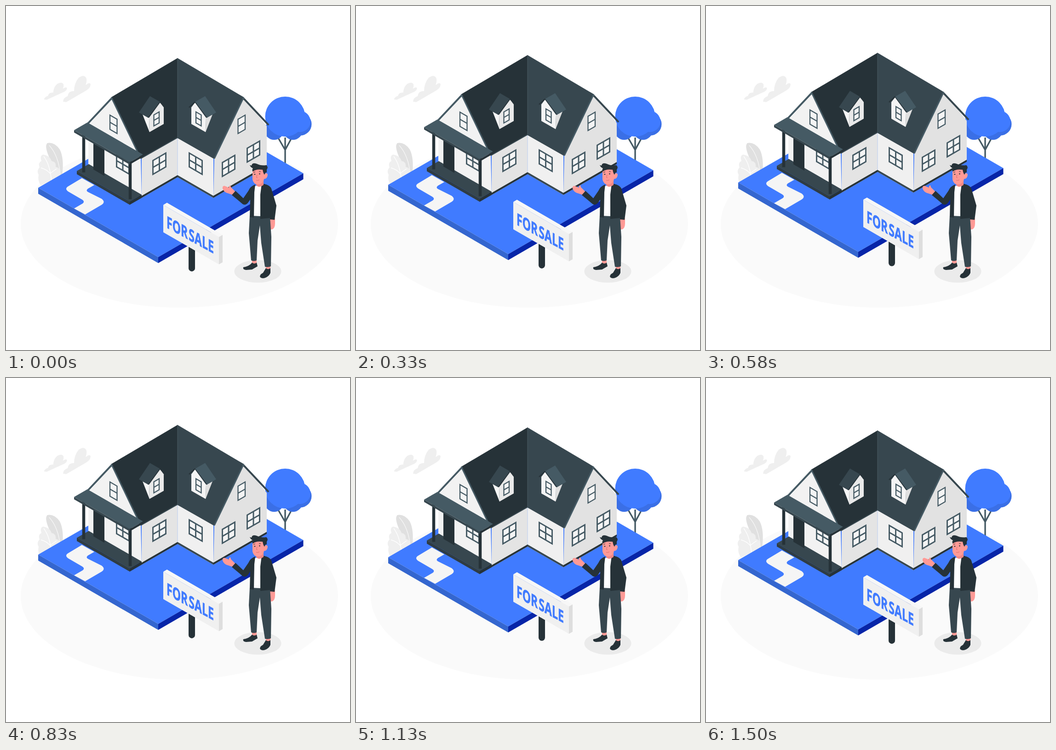
Write an HTML page that moves like this. It is 748 px wide and 748 px high and loops after 1.54 s.

```html
<!DOCTYPE html>
<html lang="en">
<head>
<meta charset="utf-8">
<title>House for sale</title>
<style>
html, body { margin: 0; width: 100%; height: 100%; overflow: hidden; background: #fff; }
svg { display: block; width: 100vw; height: 100vh; }
text { font: 700 36px "Open Sans", "Noto Sans", sans-serif; word-spacing: -6px; }
</style>
</head>
<body>
<svg viewBox="0 0 748 748">
  <ellipse cx="377" cy="474" rx="345" ry="182" fill="#fafafa"/>

  <g fill="#efefef">
    <path id="cloud" d="M124 208Q125 199 134 196Q136 184 148 185Q148 168 158 156Q171 147 175 158Q176 165 173 172Q183 164 184 171Q183 179 174 184L131 209Z"/>
    <use href="#cloud" transform="translate(-20 68) scale(.83 .65)"/>
  </g>

  <g fill="none" stroke-width="1.3">
    <path d="M90 298Q84 303 91 322Q99 342 104 352Q110 366 122 368Q127 332 117 312Q105 295 90 298Z" fill="#e0e0e0"/>
    <path d="M94 303Q114 325 118 366" stroke="#f7f7f7"/>
    <path d="M81 323Q73 325 77 337Q69 341 73 351Q66 358 71 367Q68 380 76 390L118 372Q119 350 108 350Q110 339 99 337Q96 326 81 323Z" fill="#efefef"/>
    <path d="M82 327Q96 345 99 382M76 352Q88 355 96 364L110 354" stroke="#fff"/>
  </g>

  <path d="M607 348V286M607 313L592 287M607 313L621 287" fill="none" stroke="#455a64" stroke-width="3.4"/>
  <g fill="#3a6fe6">
    <circle cx="583" cy="270" r="21"/><circle cx="624" cy="270" r="21"/><circle cx="640" cy="257" r="24.5"/>
  </g>
  <g fill="#407bff">
    <circle cx="607" cy="240.5" r="43.5"/><circle cx="639" cy="251" r="23"/>
  </g>

  <g id="lot">
    <g id="ground"></g>
    <path d="M165 375L135 393Q127 398 135 404L166 422Q172 426 167 430L148 441L172 454L208 433Q217 427 208 420L178 405Q173 402 178 398L192 390Z" fill="#f5f5f5"/>
    <g id="house"></g>
    <path d="M404 515V571" stroke="#263238" stroke-width="14" stroke-linecap="round"/>
    <g id="sign"></g>
    <text transform="matrix(.64 .355 0 1 349 482.5)" fill="#407bff" stroke="#407bff" stroke-width=".8">FOR SALE</text>
  </g>

  <ellipse cx="547.5" cy="577" rx="51" ry="24.5" fill="#ebebeb"/>

  <g fill="#ff9a96">
    <path d="M535 549H545V561L535 562ZM565 562H575V575L565 574Z"/>
    <path d="M498 403L489 394L488 390Q484 391 485 395L475 391Q470 391 471 397Q474 405 482 407L494 411Z"/>
    <path d="M573 461H585L585 473Q585 485 577 486Q570 484 571 478Q575 473 573 461Z"/>
  </g>
  <path d="M530 456L528 494L533 553Q539 556 545 553L547 510L552 477L555 515L563 567Q570 569 576 566L577 502L574 458Z" fill="#37474f"/>
  <path d="M540 392L556 388L559 449L538 451Z" fill="#fff"/>
  <g fill="#263238">
    <path d="M516 568Q514 573 522 574L535 573L547 566L545 558Q540 562 535 558Q529 566 516 568Z"/>
    <path d="M553 590Q550 585 559 580L565 570Q570 574 575 570L575 580Q573 586 566 590Q558 594 553 590Z"/>
    <path d="M542 388Q531 392 527 402L516 418L499 402L491 411L515 431Q521 434 526 428L531 421L530 459L539 460L540 405Z"/>
    <path d="M556 386Q573 388 577 397L588 434L584 465L574 464V461L553 463L553 410Z"/>
  </g>
  <path d="M545 375L560 372L560 389Q549 397 544 389Z" fill="#f58984"/>
  <path d="M536 354L562 352L562 365Q568 361 569 367Q568 376 561 376Q559 388 546 388Q538 387 536 377Z" fill="#ff9a96"/>
  <path d="M530 346Q532 351 537 353Q534 357 537 360Q543 354 558 356Q559 363 562 367Q564 361 567 362L567 356Q571 350 566 346Q555 348 545 343Q535 340 534 347Z" fill="#263238"/>
  <path d="M538 362L542 360.5M550 360L554 360.5" stroke="#263238"/>
  <path d="M546 367L544.5 373L547 373.5M544 379Q548 380 551 378" fill="none" stroke="#d9706e"/>
  <circle cx="541" cy="366" r="1.3" fill="#263238"/><circle cx="551.5" cy="365" r="1.3" fill="#263238"/>
</svg>

<script>
const DARK = "#263238", MID = "#37474f", LIGHT = "#455a64", GLASS = "#f4f4f4";
const SLOPE = Math.tan(Math.PI / 6);
const layer = id => document.getElementById(id);
const lot = layer("lot");
let into = layer("ground");
let side = 1; // 1 draws to the right of the inner corner, -1 mirrors to the left

// a runs down right, b down left, h up; the inner corner of the house is 0, 0, 0
const iso = ([a, b, h]) => `${373 + side * (a - b)} ${373 + (a + b) * SLOPE - h}`;

function path(points, attrs, close) {
  const el = document.createElementNS("http://www.w3.org/2000/svg", "path");
  el.setAttribute("d", "M" + points.map(iso).join("L") + (close ? "Z" : ""));
  for (const k in attrs) el.setAttribute(k, attrs[k]);
  into.append(el);
}
const face = (fill, ...points) => path(points, { fill }, true);
const line = (stroke, width, ...points) => path(points, { fill: "none", stroke, "stroke-width": width });

// Upright rectangle on the plane a = at or b = at
const spot = (axis, at, u, h) => axis === "a" ? [at, u, h] : [u, at, h];
function panel(fill, axis, at, [u0, u1], [h0, h1]) {
  face(fill, spot(axis, at, u0, h0), spot(axis, at, u1, h0), spot(axis, at, u1, h1), spot(axis, at, u0, h1));
}

function box(a, b, h, [top, faceA, faceB]) {
  face(top, [a[0], b[0], h[1]], [a[1], b[0], h[1]], [a[1], b[1], h[1]], [a[0], b[1], h[1]]);
  panel(faceA, "a", a[1], b, h);
  panel(faceB, "b", b[1], a, h);
}

function pane(axis, at, u, width, bottom, height, cols) {
  const thick = cols > 1 ? 2.9 : 2.3;
  const p = (i, j) => spot(axis, at, u + i * width, bottom + j * height);
  path([p(0, 0), p(1, 0), p(1, 1), p(0, 1)], { fill: GLASS, stroke: LIGHT, "stroke-width": thick }, true);
  line(LIGHT, thick, p(0, .5), p(1, .5));
  if (cols > 1) line(LIGHT, thick, p(.5, 0), p(.5, 1));
}

const WING = 78, DEPTH = 116;
const PEAK = [-58, -58, 192], APEX = [86, -58, 190], EAVE = [82, 2, 89], VALLEY = [0, 0, 86];

function walls(inner, gable, trimInner, trimGable) {
  panel(inner, "b", 0, [0, WING], [0, 88]);
  face(gable, [WING, 0, 0], EAVE, APEX, [WING, -DEPTH, 89], [WING, -DEPTH, 0]);
  panel(trimInner, "b", 0, [0, WING], [0, 4.5]);
  panel(trimGable, "a", WING, [-DEPTH, 0], [0, 4.5]);
  pane("b", 0, 25.5, 28, 37, 30, 2);
  pane("a", WING, -69, 15.5, 109, 31, 1);
}

function roof(color) {
  face(color, PEAK, APEX, EAVE, VALLEY);
  line(MID, 2, EAVE, VALLEY);
  line(LIGHT, 3, EAVE, APEX);
  line(side > 0 ? MID : LIGHT, 4, [86, -58, 187], [84, -114, 96]);
}

function dormer(color, rake, front, cheek) {
  const ridge = [48, 10, 197], back = [48, -12, 197], low = [70, 6, 173];
  face(cheek, [61, 0, 133], [62, 0, 165], [69, -7, 172]);
  face(front, [30, 0, 133], [30, 0, 169], [38, 0, 184], [62, 0, 165], [61, 0, 133]);
  pane("b", 0, 40, 11.5, 141, 24, 1);
  face(color, ridge, back, [70, -14, 173], low);
  line(rake, 2.5, ridge, [32, 7, 174]);
  line(rake, 1.2, ridge, low);
}

function porch() {
  const span = [-117, 4];
  box([WING, 104], [-115, 0], [0, 7], [MID, "#2f3c43", DARK]);
  panel(DARK, "a", WING, [-105, -81], [1, 59]);
  pane("a", WING, -54.5, 27, 36, 27, 2);
  for (const b of [-104, -3]) line(DARK, 6.5, [100, b, 8], [100, b, 92]);
  box([79, 108], span, [92, 97], [LIGHT, MID, DARK]);
}

// Runs a builder on both halves, each with its own colours
function both(build, right, left) {
  side = 1; build(...right);
  side = -1; build(...left);
  side = 1;
}

box([-131.5, 129.5], [-144, 171.5], [-13, 0], ["#407bff", "#0725a8", "#3466cf"]);

into = layer("house");
both(walls, ["#f0f0f0", "#e2e2e2", MID, DARK], ["#e4e4e4", "#f2f2f2", DARK, DARK]);
for (const b of [-19.5, -73.5]) pane("a", WING, b - 27, 27, 35.5, 30, 2);
line("#b9cdf0", 1, [0, 0, 5], VALLEY);
both(roof, [MID], [DARK]);
line("#52626b", .8, PEAK, VALLEY);
both(dormer, [LIGHT, DARK, "#f4f4f4", "#e0e0e0"], [MID, DARK, "#e9e9e9", "#f5f5f5"]);
side = -1;
porch();
side = 1;

into = layer("sign");
box([90, 211], [113, 121], [2, 61.5], ["#f7f7f7", "#dedede", "#f0f0f0"]);

const LOOP = 1540, STEP = 1000 / 24, RISE = 15, LEAD = 65;

// Linear bob, stepped at 24 pictures per second
function draw(ms) {
  const t = Math.floor((ms % LOOP + 4) / STEP) * STEP;
  const phase = (t + LEAD) % LOOP;
  const up = Math.min(phase, LOOP - phase) / (LOOP / 2);
  lot.setAttribute("transform", `translate(0 ${(.4 - RISE * up).toFixed(2)})`);
}

const start = performance.now();
function tick() {
  draw(performance.now() - start);
  requestAnimationFrame(tick);
}
tick();
</script>
</body>
</html>
```
